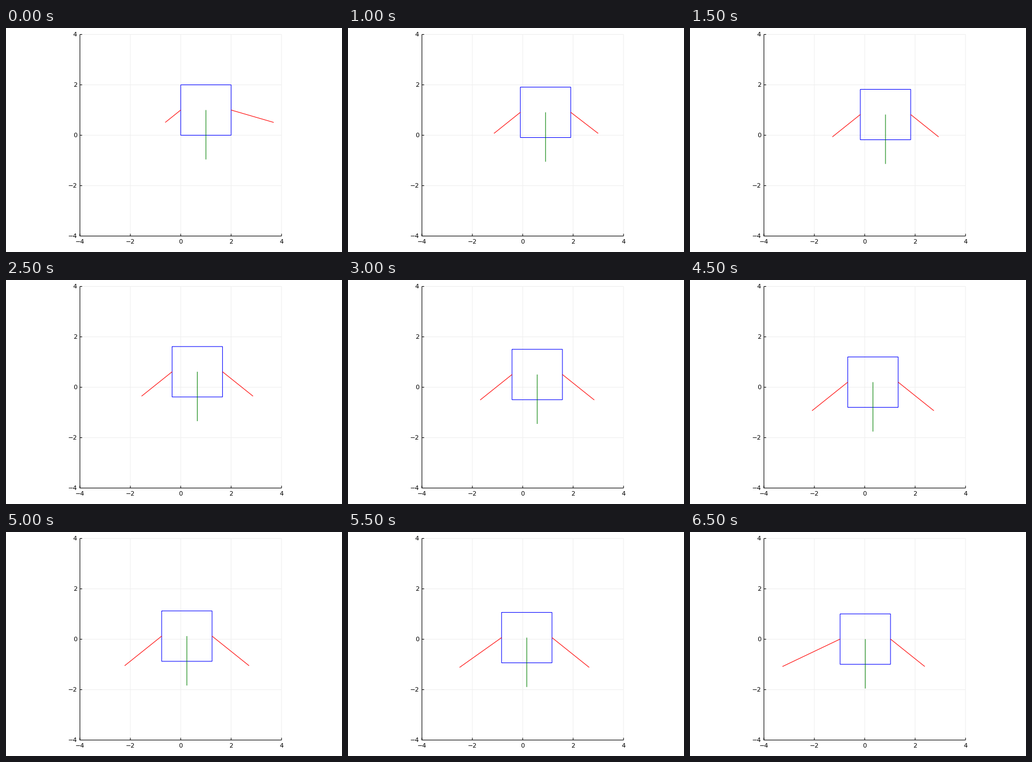
Write a matplotlib script that moves like this. It is 600x400 px and loops after 7000 ms.

```python
import numpy as np
import matplotlib.pyplot as plt
from matplotlib.animation import FuncAnimation

W, H, DPI = 600, 400, 100
LEFT, BOTTOM, UNIT = 132, 371.5, 45
X0, Y0 = LEFT + 4 * UNIT, BOTTOM - 4 * UNIT
RIGHT, TOP = LEFT + 8 * UNIT, BOTTOM - 8 * UNIT
TICKS = range(-4, 5, 2)
STEPS = 14
CONE = 0.8       # steepness limit of the side forces
WEIGHT = 88.2    # length of the gravity line

# Side forces: both lift equally; a push starts and stops the sideways motion
k = np.arange(STEPS)
lift = np.interp(k, [0, 2, 3, 10, 11, 13], [22.1, 37.7, 39.9, 52.9, 53.2, 49])
push_right = np.maximum(0, 48.4 - 23.3 * k)
push_left = np.maximum(0, 41.7 - 16.6 * (STEPS - 1 - k))


def travel(force):
    """Move one unit from rest to rest under the given force."""
    speed = np.append(0, np.cumsum(force - force.mean()))
    path = np.append(0, np.cumsum((speed[1:] + speed[:-1]) / 2))
    return UNIT * path / path[-1]


shift = travel(push_right - push_left)
drop = travel(-lift)

fig = plt.figure(figsize=(W / DPI, H / DPI), dpi=DPI, facecolor="white")
ax = fig.add_axes([0, 0, 1, 1])
ax.set_xlim(0, W)
ax.set_ylim(H, 0)
ax.axis("off")


def px(n):
    return n * 72 / DPI


def line(xs, ys, color):
    return ax.plot(xs, ys, color=color, lw=px(1.05), snap=False,
                   solid_capstyle="butt", solid_joinstyle="miter")[0]


def label(x, y, n, ha):
    ax.text(x, y, str(n).replace("-", "\u2212"), family="DejaVu Sans",
            fontsize=px(11.1), color="black", ha=ha, va="baseline")


for n in TICKS:
    x, y = X0 + n * UNIT, Y0 - n * UNIT
    line([x, x], [TOP, BOTTOM], "#efefef")
    line([LEFT, RIGHT], [y, y], "#efefef")
for n in TICKS:
    x, y = X0 + n * UNIT, Y0 - n * UNIT
    line([x, x], [BOTTOM, BOTTOM - 4], "black")
    line([LEFT, LEFT + 4], [y, y], "black")
    label(x - 0.4, 385, n, "center")
    label(127, y + 3.6, n, "right")
line([LEFT, LEFT], [TOP, BOTTOM + 0.5], "black")
line([LEFT, RIGHT], [BOTTOM, BOTTOM], "black")

body = line([], [], "#0000ff")
gravity = line([], [], "#008000")
left_arm = line([], [], "#ff0000")
right_arm = line([], [], "#ff0000")


def draw(i):
    cx, cy = X0 + UNIT - shift[i], Y0 - UNIT + drop[i]
    l, r, t, b = cx - UNIT, cx + UNIT, cy - UNIT, cy + UNIT
    reach, tip = lift[i] / CONE, cy + lift[i]
    body.set_data([l, r, r, l, l], [t, t, b, b, t])
    gravity.set_data([cx, cx], [cy, cy + WEIGHT])
    left_arm.set_data([l, l - reach - push_left[i]], [cy, tip])
    right_arm.set_data([r, r + reach + push_right[i]], [cy, tip])
    return body, gravity, left_arm, right_arm


anim = FuncAnimation(fig, draw, frames=STEPS, interval=500, repeat=True,
                     repeat_delay=0)
plt.show()
```
